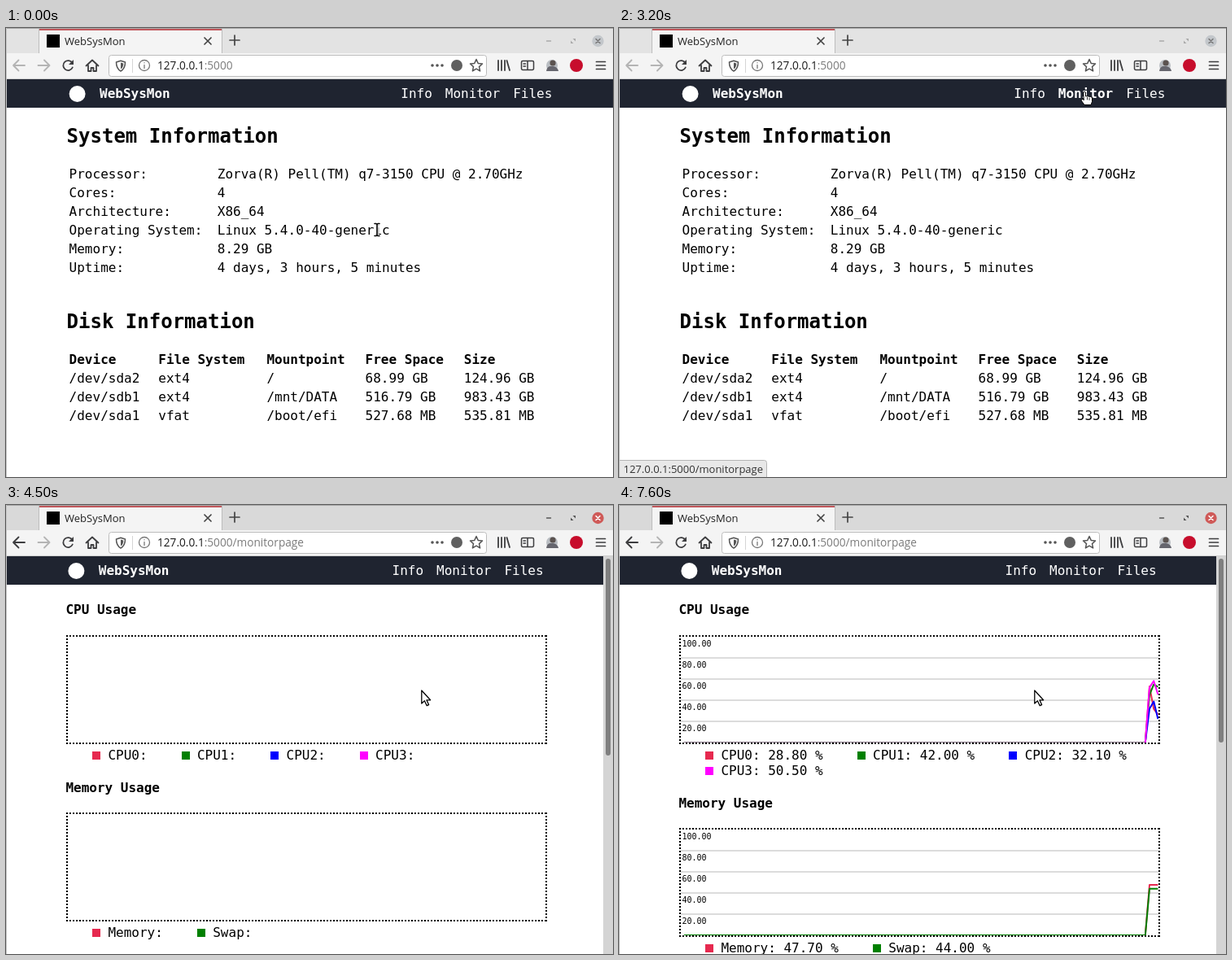
These frames come from a looping animation (746x552 px, 8000 ms). An HTML page with a canvas:

```html
<!DOCTYPE html>
<html lang="en">
<head>
<meta charset="utf-8">
<title>System monitor</title>
<style>
html, body { margin: 0; width: 100%; height: 100%; overflow: hidden; background: #fff; }
canvas { display: block; }
</style>
</head>
<body>
<canvas id="stage" width="746" height="552"></canvas>
<script>
const ctx = document.getElementById('stage').getContext('2d');
const LOOP = 8000;
const MONO = '"DejaVu Sans Mono", monospace';
const SANS = '"Open Sans", sans-serif';
const CHAR = 9.633;
const COLORS = ['#e6294f', '#008000', '#0000ff', '#ff00ff'];

// Times of the visible events, in ms
const HOVER = 3000, STATUS = 3100, ACTIVE = 3400, LOAD = 3500, LEAVE = 3900, DATA = 4700;

// time, kind, x, y
const CURSOR = [
  [0, 'beam', 456, 248], [700, 'beam', 462, 249], [800, 'beam', 456, 249],
  [1100, 'beam', 455, 249], [1300, 'beam', 454, 249.5], [1800, 'beam', 454, 250],
  [2200, 'beam', 488, 222], [2300, 'beam', 520, 196], [2900, 'beam', 546, 142],
  [3000, 'hand', 573, 84], [3100, 'hand', 574, 86],
  [3900, 'arrow', 557, 128], [4000, 'arrow', 526, 198], [4100, 'arrow', 510, 227]
];
const CPU = [
  [53, 45, 32, 52], [31.8, 54.9, 38.8, 58.3],
  [26.4, 52.6, 22.3, 45.4], [28.8, 42, 32.1, 50.5]
];
const MEMORY = [47.7, 44];
const SYSTEM = [
  ['Processor:', 'Zorva(R) Pell(TM) q7-3150 CPU @ 2.70GHz'],
  ['Cores:', '4'],
  ['Architecture:', 'X86_64'],
  ['Operating System:', 'Linux 5.4.0-40-generic'],
  ['Memory:', '8.29 GB'],
  ['Uptime:', '4 days, 3 hours, 5 minutes']
];
const DISKS = [
  ['Device', 'File System', 'Mountpoint', 'Free Space', 'Size'],
  ['/dev/sda2', 'ext4', '/', '68.99 GB', '124.96 GB'],
  ['/dev/sdb1', 'ext4', '/mnt/DATA', '516.79 GB', '983.43 GB'],
  ['/dev/sda1', 'vfat', '/boot/efi', '527.68 MB', '535.81 MB']
];
const DISK_X = [77.6, 187.3, 320.4, 441.6, 562.8];

function rect(x, y, w, h, color) {
  ctx.fillStyle = color;
  ctx.fillRect(x, y, w, h);
}

function text(str, x, y, { size = 16, bold = false, color = '#000', family = MONO } = {}) {
  ctx.font = `${bold ? 'bold ' : ''}${size}px ${family}`;
  ctx.fillStyle = color;
  ctx.fillText(str, x, y);
}

function disc(x, y, r, color) {
  ctx.fillStyle = color;
  ctx.beginPath();
  ctx.arc(x, y, r, 0, Math.PI * 2);
  ctx.fill();
}

function path(d, { fill, stroke, width = 1.8, x = 0, y = 0 }) {
  const shape = new Path2D(d);
  ctx.save();
  ctx.translate(x, y);
  ctx.lineJoin = ctx.lineCap = 'round';
  ctx.lineWidth = width;
  if (fill) { ctx.fillStyle = fill; ctx.fill(shape); }
  if (stroke) { ctx.strokeStyle = stroke; ctx.stroke(shape); }
  ctx.restore();
}

function roundBox(x, y, w, h, radius, fill, stroke) {
  ctx.beginPath();
  ctx.roundRect(x, y, w, h, radius);
  ctx.fillStyle = fill;
  ctx.fill();
  if (!stroke) return;
  ctx.strokeStyle = stroke;
  ctx.lineWidth = 1;
  ctx.stroke();
}

function drawTabs(t) {
  const active = t >= ACTIVE;
  rect(0, 0, 746, 32, active ? '#d9d9d9' : '#e3e3e3');
  rect(0, 0, 746, 1, '#a8a8a8');
  rect(40, 1, 226, 31, '#bdbdbd');
  rect(41, 1, 224, 31, '#f4f4f4');
  rect(41, 1, 224, 2, '#c2575b');

  const step = Math.floor((t - LOAD) / 100);
  if (step >= 0 && step < 4) {
    ctx.save();
    ctx.beginPath();
    ctx.rect(41, 3, 224, 28);
    ctx.clip();
    ctx.globalAlpha = [0.45, 0.42, 0.25, 0.1][step];
    disc(58, 16, [17, 32, 62, 96][step], '#0a84ff');
    ctx.restore();
  }
  rect(50, 8, 16, 16, '#000');
  text('WebSysMon', 72, 21, { size: 13, family: SANS, color: '#222' });
  path('M244 12l8 8m0-8l-8 8', { stroke: '#444', width: 1.7 });
  path('M281 9v12m-6-6h12', { stroke: '#444', width: 1.7 });

  const control = active ? '#555' : '#aaa';
  path('M664.5 16h5', { stroke: control, width: 1.4 });
  path('M696.5 13h3.5v3.5zM694 15.500v3.500h3.500z', { fill: control });
  disc(727.5, 16, 7.2, active ? '#cf5a58' : '#c3c7cb');
  path('M725 13.500l5 5m0-5l-5 5', { stroke: active ? '#fff' : '#777', width: 1.5 });
}

function drawToolbar(t) {
  const loaded = t >= LOAD;
  const ink = '#3d3d3f', pale = '#b4b4b4';
  rect(0, 31, 746, 32, '#f4f4f4');
  rect(0, 62, 746, 1, '#cfcfcf');
  path('M23 46h-14m6.500-6.500l-6.500 6.500 6.500 6.500', { stroke: loaded ? ink : pale });
  path('M39.500 46h14m-6.500-6.500l6.500 6.500-6.500 6.500', { stroke: pale });
  path('M81.500 43a6 6 0 1 0 .3 5.500', { stroke: ink });
  path('M83 39v6h-6z', { fill: ink });
  path('M98.500 46.500l7.500-7 7.500 7M101 46v7h3.500v-4h3v4h3.500v-7', { stroke: ink });

  roundBox(126.5, 33.5, 464, 26, 3, '#fff', '#bcbcbc');
  path('M141 40.200l5.500 1.800c0 5-1 8.500-5.500 11-4.500-2.500-5.500-6-5.500-11z', { stroke: '#555', width: 1.5 });
  path('M141 42.500l3.300 1c0 3-.8 5.500-3.300 7z', { fill: '#555' });
  rect(155, 38, 1, 17, '#d5d5d5');
  path('M163.500 46a6.500 6.500 0 1 0 13 0a6.500 6.500 0 1 0-13 0M170 45.500v4M170 42.700v.1', { stroke: '#777', width: 1.3 });
  const url = { size: 13.65, family: SANS, color: '#1c1c1c' };
  text('127.0.0.1', 186, 51, url);
  const hostEnd = 186 + ctx.measureText('127.0.0.1').width;
  text(':5000' + (loaded ? '/monitorpage' : ''), hostEnd, 51, { ...url, color: '#7b7b7b' });

  for (const x of [524, 530, 536]) disc(x, 46, 1.8, '#555');
  disc(554, 46, 7, '#606060');
  path('M578 38.500l2.200 4.900 5.300.6-4 3.600 1.100 5.300-4.600-2.700-4.600 2.700 1.100-5.300-4-3.600 5.300-.6z', { stroke: '#555', width: 1.5 });
  path('M605 40v12M609 40v12M613 40v12M615.500 40l3.500 12', { stroke: ink });
  path('M635 40.500h12a1.500 1.500 0 0 1 1.500 1.500v8a1.500 1.500 0 0 1-1.500 1.500h-12a1.500 1.500 0 0 1-1.500-1.500v-8a1.500 1.500 0 0 1 1.500-1.500zM641 41v10M636 44h2.500M636 47h2.500', { stroke: ink, width: 1.5 });
  disc(671, 46, 7, '#b9bdc2');
  disc(672, 43, 3.6, '#5b5350');
  path('M664 53c1-6 4-6 7-6s7 1 8 6z', { fill: '#66666e' });
  disc(701, 46, 8, '#c70d2c');
  path('M725.500 41.500h11M725.500 46h11M725.500 50.500h11', { stroke: ink, width: 1.7 });
}

function drawHeader(t) {
  const loaded = t >= LOAD;
  const left = loaded ? 73.4 : 74.6;
  const shift = loaded ? -10.8 : 0;
  const hover = t >= HOVER && t < LEAVE;
  rect(1, 63, loaded ? 733 : 745, 35, '#1f2430');
  disc(left + 13, 81, 10, '#fff');
  text('WebSysMon', left + 40.4, 86, { bold: true, color: '#fff' });
  text('Info', 485.3 + shift, 86, { color: '#fff' });
  text('Monitor', 539.8 + shift, 86, { bold: hover, color: '#fff' });
  text('Files', 623.2 + shift, 86, { color: '#fff' });
}

function drawInfoPage() {
  text('System Information', 74.6, 141, { size: 24, bold: true });
  SYSTEM.forEach(([label, value], i) => {
    text(label, 77.6, 185 + i * 23);
    text(value, 259.8, 185 + i * 23);
  });
  text('Disk Information', 74.6, 369, { size: 24, bold: true });
  DISKS.forEach((row, i) => row.forEach((cell, j) =>
    text(cell, DISK_X[j], 413 + i * 23, { bold: i === 0 })));
}

function drawChart(top, samples, baseColor) {
  const base = top + 132;
  if (samples) {
    for (let i = 1; i < 5; i++) rect(76, top + 1 + i * 26, 587, 2, '#dcdcdc');
    for (let i = 0; i < 5; i++) {
      text((100 - i * 20).toFixed(2), 77.5, top + 14 + i * 26, { size: 10 });
    }
    const right = 662.4, step = 5.2;
    const start = right - samples.length * step;
    rect(80, base - 1, start - 80, 1, baseColor);
    ctx.save();
    ctx.beginPath();
    ctx.rect(76, top + 2, 587, 130);
    ctx.clip();
    ctx.lineWidth = 2;
    ctx.lineJoin = 'round';
    const lines = samples.length ? samples[0].length : 0;
    for (let k = 0; k < lines; k++) {
      ctx.strokeStyle = COLORS[k];
      ctx.beginPath();
      ctx.moveTo(start, base);
      samples.forEach((s, i) => ctx.lineTo(start + (i + 1) * step, base - s[k] * 1.3));
      ctx.stroke();
    }
    ctx.restore();
  }
  ctx.strokeStyle = '#000';
  ctx.lineWidth = 2;
  ctx.setLineDash([2, 2]);
  for (const [x1, y1, x2, y2] of [
    [74, top + 1, 665, top + 1], [74, top + 133, 665, top + 133],
    [75, top, 75, top + 134], [664, top, 664, top + 134]
  ]) {
    ctx.beginPath();
    ctx.moveTo(x1, y1);
    ctx.lineTo(x2, y2);
    ctx.stroke();
  }
  ctx.setLineDash([]);
}

function drawLegend(names, values, baseline) {
  let x = 106, y = baseline;
  names.forEach((name, i) => {
    const label = `${name}:` + (values ? ` ${values[i].toFixed(2)} %` : '');
    if (x + label.length * CHAR > 660) { x = 106; y += 19; }
    rect(Math.round(x), y - 10, 10, 10, COLORS[i]);
    text(label, x + 19.4, y);
    x += label.length * CHAR + 61.4;
  });
}

function drawMonitorPage(t) {
  const tick = t < DATA ? -1 : t < 5600 ? 0 : t < 6600 ? 1 : t < 7600 ? 2 : 3;
  const ready = tick >= 0;
  const drop = ready ? 19 : 0;
  const history = ready ? CPU.slice(0, tick) : null;
  text('CPU Usage', 73.4, 134, { bold: true });
  drawChart(160, history, '#8a7a8a');
  drawLegend(['CPU0', 'CPU1', 'CPU2', 'CPU3'], ready && CPU[tick], 313);
  text('Memory Usage', 73.4, 353 + drop, { bold: true });
  drawChart(378 + drop, history && history.map(() => MEMORY), COLORS[1]);
  drawLegend(['Memory', 'Swap'], ready && MEMORY, 531 + drop);

  rect(734, 63, 12, 489, '#d4d4d4');
  roundBox(737, 66, 6, ready ? 226 : 242, 3, '#7f7f7f');
}

function drawStatus(t) {
  let alpha = 0;
  if (t >= STATUS && t < LOAD || t >= 3800 && t < 4300) alpha = 1;
  else if (t >= 4300 && t < 4400) alpha = 0.65;
  else if (t >= 4400 && t < 4500) alpha = 0.3;
  if (!alpha) return;
  ctx.save();
  ctx.globalAlpha = alpha;
  roundBox(0.5, 531.5, 181, 24, [0, 3, 0, 0], '#e8e8e8', '#b5b5b5');
  text('127.0.0.1:5000/monitorpage', 5.5, 547, { size: 13, family: SANS, color: '#333' });
  ctx.restore();
}

function drawCursor(t) {
  const [, kind, x, y] = CURSOR.filter(key => key[0] <= t).pop();
  if (kind === 'beam') {
    const beam = 'M-3-7.500h2l1 1 1-1h2M0-6.500v13M-3 7.500h2l1-1 1 1h2';
    path(beam, { stroke: '#fff', width: 3.6, x, y });
    path(beam, { stroke: '#000', width: 1.6, x, y });
  } else if (kind === 'hand') {
    path('M-3-7q1.500-1.500 2.500 0v5l2-.5 2 .8 2 .2 2 1v5l-1.500 4h-8l-4-5.500q0-2 2-1.500l1 1z',
      { fill: '#fff', stroke: '#000', width: 1, x, y });
    path('M1.500-1v3M4 0v2.500', { stroke: '#000', width: 0.8, x, y });
  } else {
    path('M.8 1v16l3.600-3.300 2.800 6 2.400-1.100-2.700-5.800h4.700z',
      { fill: '#fff', stroke: '#000', width: 1.3, x, y });
  }
}

function draw(t) {
  rect(0, 0, 746, 552, '#fff');
  drawTabs(t);
  drawToolbar(t);
  drawHeader(t);
  if (t < LOAD) drawInfoPage();
  else drawMonitorPage(t);
  drawStatus(t);
  rect(0, 0, 1, 552, '#c4c4c4');
  drawCursor(t);
}

const began = performance.now();
function frame() {
  draw((performance.now() - began) % LOOP);
  requestAnimationFrame(frame);
}
frame();
</script>
</body>
</html>
```
